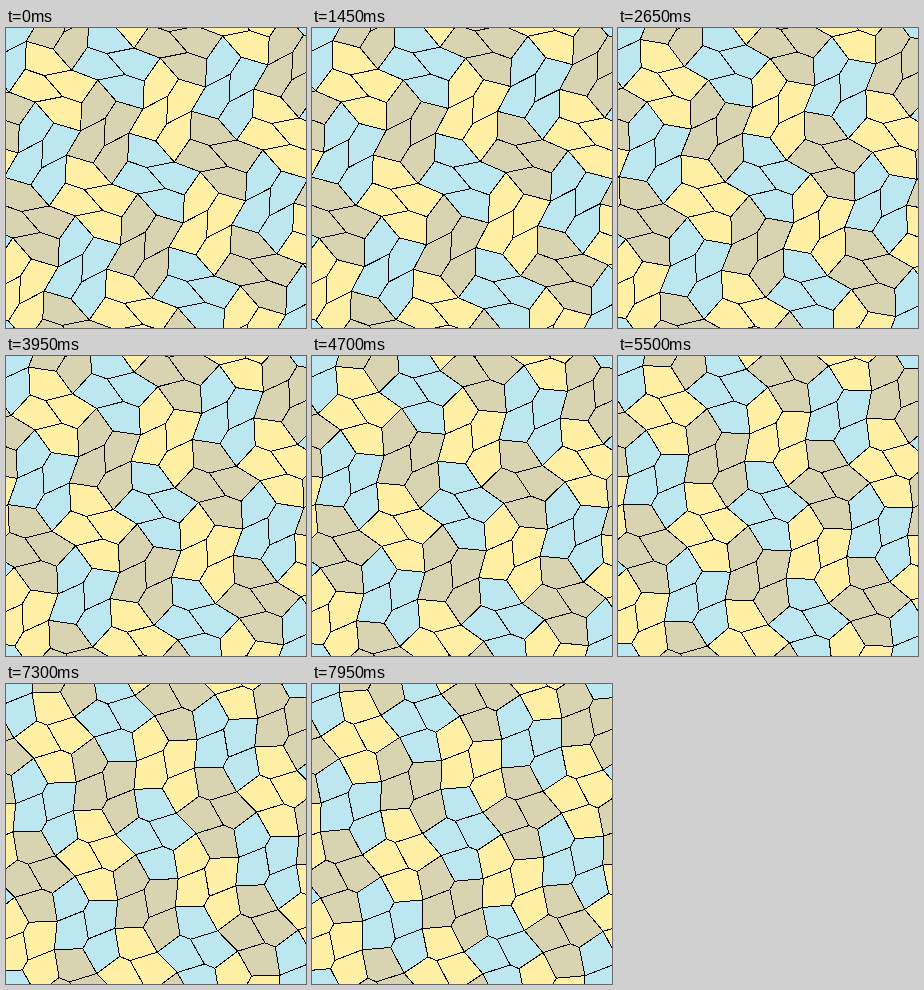
Animation of 300 by 300 pixels, one loop 8 s. Source, as an HTML page:

```html
<!DOCTYPE html>
<html lang="en">
<head>
<meta charset="utf-8">
<title>Pentagonal tiling</title>
<style>
  html, body { margin: 0; width: 100%; height: 100%; overflow: hidden; background: #fff; }
  svg { display: block; width: 100vw; height: 100vh; }
  path { stroke: #000; stroke-width: 1; stroke-linejoin: round; shape-rendering: crispEdges; }
</style>
</head>
<body>
<svg viewBox="0 0 300 300">
  <path fill="#bde7f0"/>
  <path fill="#d8d4b2"/>
  <path fill="#fff0a5"/>
</svg>
<script>
const LOOP = 8000, CYCLE = 2950, HOLD = 1000, STEP = 50, STEPS = 40;
const CELL_AREA = 8000, TILT = 19.4 * Math.PI / 180, CENTER = 150;
const FIRST_ANGLE = 150, ANGLE_PER_CYCLE = -4;
const { sin, cos, hypot, atan2, sqrt, PI } = Math;
const paths = [...document.querySelectorAll('path')];

function progress(t) {
  const cycle = Math.floor(t / CYCLE), local = t - cycle * CYCLE;
  const steps = local < HOLD ? 0 : Math.floor((local - HOLD) / STEP) + 1;
  return cycle + steps / STEPS;
}

// Angle A that closes the pentagon for a given E, found by bisection.
function closingAngle(E) {
  let low = PI / 2, high = PI * 3 / 4;
  for (let i = 0; i < 40; i++) {
    const A = (low + high) / 2;
    if (sin(A) + sin(2 * A + E) < 2 * sin(E)) low = A;
    else high = A;
  }
  return low;
}

// Pentagon ABCDE with AB = BC = CD = DE, 2A + C = 360 and D + 2E = 360.
function pentagon(E) {
  const A = closingAngle(E), bend = 2 * A + E;
  const b = [cos(A), sin(A)];
  const c = [b[0] + cos(bend), b[1] + sin(bend)];
  const d = [c[0] - cos(E), c[1] - sin(E)];
  return [[0, 0], b, c, d, [c[0], 0]];
}

function area(points) {
  return Math.abs(points.reduce((sum, [x, y], i) => {
    const [nx, ny] = points[(i + 1) % points.length];
    return sum + x * ny - y * nx;
  }, 0)) / 2;
}

// Four tiles round a half-turn centre, with the short lattice vector along x.
function buildCluster(E) {
  const tile = pentagon(E), [, b, c, d, e] = tile;
  const mid = [(d[0] + e[0]) / 2, (d[1] + e[1]) / 2];
  const axis = [d[0] + e[0] - b[0] - c[0], d[1] + e[1] - b[1] - c[1]];
  const short = hypot(...axis), turn = -atan2(axis[1], axis[0]);
  const scale = sqrt(CELL_AREA / (8 * area(tile)));
  const place = ([x, y]) => {
    x -= mid[0];
    y -= mid[1];
    return [scale * (x * cos(turn) - y * sin(turn)), scale * (x * sin(turn) + y * cos(turn))];
  };
  const pair = [tile.map(place), tile.map(([x, y]) => place([x, -y]))];
  const tiles = [...pair, ...pair.map(t => t.map(([x, y]) => [-x, -y]))];
  return { tiles, width: short * scale, height: CELL_AREA / (short * scale) };
}

function draw(t) {
  const E = (FIRST_ANGLE + ANGLE_PER_CYCLE * progress(t)) * PI / 180;
  const { tiles, width, height } = buildCluster(E);
  const data = ['', '', ''];
  const toScreen = ([x, y]) => [
    CENTER + x * cos(TILT) - y * sin(TILT),
    CENTER - x * sin(TILT) - y * cos(TILT)
  ].map(n => n.toFixed(2)).join(' ');
  const addCluster = (col, row, flip, color) => {
    for (const tile of tiles) {
      const points = tile.map(([x, y]) => toScreen([x + col * width, flip * y + row * height]));
      data[color] += `M${points.join('L')}Z`;
    }
  };
  for (let row = -3; row <= 3; row++) {
    for (let col = -6; col <= 6; col++) {
      addCluster(col, row, -1, (col + 6) % 3);
      addCluster(col + 0.5, row + 0.5, 1, (col + 8) % 3);
    }
  }
  paths.forEach((path, i) => path.setAttribute('d', data[i]));
}

function tick() {
  draw(performance.now() % LOOP);
  requestAnimationFrame(tick);
}
tick();
</script>
</body>
</html>
```
